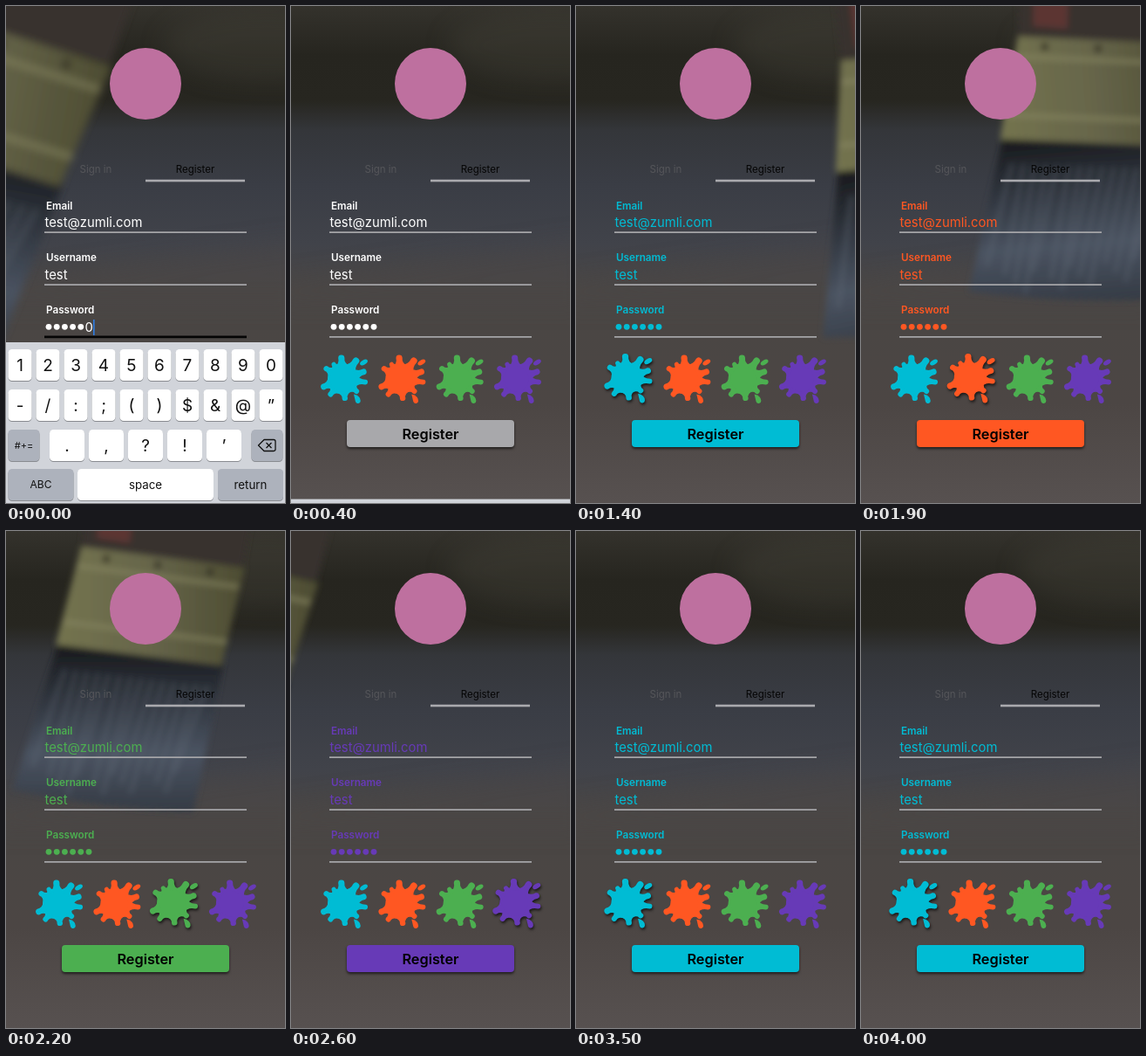
An HTML page that plays this animation: 320 px wide and 569 px high, repeating every 4100 ms.

```html
<!DOCTYPE html>
<html lang="en">
<head>
<meta charset="utf-8">
<title>Register</title>
<style>
  html, body { margin: 0; width: 100%; height: 100%; overflow: hidden; background: #2b2925; }
  svg { display: block; width: 320px; height: 569px; font-family: Inter, Roboto, sans-serif; }
  .tab { font-size: 11.5px; text-anchor: middle; }
  .label { font-size: 11.7px; font-weight: 600; }
  .value { font-size: 14.8px; }
  .key { text-anchor: middle; fill: #111; }
  .lift { filter: drop-shadow(1px 2px 1.5px rgba(0, 0, 0, .65)); }
  #button { filter: drop-shadow(0 2px 1.5px rgba(0, 0, 0, .6)); }
</style>
</head>
<body>
<svg viewBox="0 0 320 569">
  <defs>
    <linearGradient id="room" x1="0" y1="0" x2="0" y2="1">
      <stop offset="0" stop-color="#34322c"/>
      <stop offset=".1" stop-color="#26251f"/>
      <stop offset=".19" stop-color="#272620"/>
      <stop offset=".25" stop-color="#34363a"/>
      <stop offset=".36" stop-color="#3a3d45"/>
      <stop offset=".48" stop-color="#41434a"/>
      <stop offset=".57" stop-color="#494644"/>
      <stop offset=".8" stop-color="#4c4644"/>
      <stop offset="1" stop-color="#575150"/>
    </linearGradient>
    <linearGradient id="metal" x1="0" y1="0" x2="1" y2="0">
      <stop offset="0" stop-color="#74744f"/>
      <stop offset=".5" stop-color="#66654a"/>
      <stop offset="1" stop-color="#4d4c32"/>
    </linearGradient>
    <linearGradient id="hair" x1="0" y1="0" x2="0" y2="1">
      <stop offset="0" stop-color="#17181b"/>
      <stop offset=".28" stop-color="#2b3038"/>
      <stop offset=".65" stop-color="#4a5361"/>
      <stop offset="1" stop-color="#343a44"/>
    </linearGradient>
    <filter id="soft" x="-20%" y="-20%" width="140%" height="140%"><feGaussianBlur stdDeviation="3.5"/></filter>
    <filter id="haze" x="-50%" y="-50%" width="200%" height="200%"><feGaussianBlur stdDeviation="14"/></filter>
  </defs>

  <rect width="320" height="569" fill="url(#room)"/>
  <ellipse cx="300" cy="45" rx="120" ry="40" fill="#4a463d" opacity=".35" filter="url(#haze)"/>
  <path d="M-20 318L340 268V340H-20Z" fill="#4b4746" opacity=".5" filter="url(#haze)"/>
  <ellipse id="mirror" cx="295" cy="350" rx="48" ry="38" fill="#6c7356" filter="url(#haze)"/>

  <g id="brush" filter="url(#soft)">
    <path d="M95 -60L285 -35L272 40L86 22Z" fill="#37312e"/>
    <path d="M110 -60L150 -55L142 14L104 8Z" fill="#5b3432"/>
    <path d="M60 128L250 150L215 322Q110 318 8 296Z" fill="url(#hair)"/>
    <g id="strands" stroke="#69727f" stroke-width="4" opacity=".35"/>
    <path d="M86 18L274 42L247 154L57 130Z" fill="url(#metal)"/>
    <path d="M82 40L267 64M66 104L254 127" stroke="#8b8a64" stroke-width="5" opacity=".6"/>
    <g fill="#302f20"><circle cx="115" cy="32" r="4"/><circle cx="174" cy="39" r="4"/><circle cx="234" cy="47" r="4"/></g>
  </g>

  <circle cx="160" cy="89" r="41" fill="#be709f"/>

  <text class="tab" x="103" y="190.5" fill="#55565a">Sign in</text>
  <text class="tab" x="217" y="190.5" fill="#050505">Register</text>
  <rect x="160" y="198.7" width="114" height="2.6" fill="#aaaaae"/>

  <g id="form">
    <text class="label" x="46" y="232.5">Email</text>
    <text class="value" x="44.5" y="253">test@zumli.com</text>
    <text class="label" x="46" y="292.3">Username</text>
    <text class="value" x="44.5" y="313">test</text>
    <text class="label" x="46" y="352.3">Password</text>
    <g id="dots"></g>
    <text class="value" id="typed" x="90.5" y="373">0</text>
  </g>
  <rect id="caret" x="100" y="359" width="1.6" height="18" fill="#2f7de1"/>
  <path d="M44 259.2H276M44 319.2H276" stroke="#a5a5a8" stroke-width="1.7"/>
  <path id="line" d="M44 378.8H276"/>

  <g id="splats"></g>
  <g id="button">
    <rect id="face" x="64" y="474" width="192" height="31" rx="4"/>
    <text x="160" y="495.7" font-size="16.3" font-weight="600" text-anchor="middle">Register</text>
  </g>
  <g id="keyboard"><rect y="385" width="320" height="190" fill="#d1d4da"/></g>
</svg>

<script>
const LOOP = 4100, STEP = 100;
const COLORS = ['#00bcd4', '#ff5722', '#4caf50', '#673ab7'];
const PICKS = [[1300, 0], [1700, 1], [2100, 2], [2500, 3], [2900, 0]];
// time, x, y, angle, scale
const PATH = [
  [0, -194, 16, 10, 1.3], [200, -300, 10, 10, 1.3], [400, -460, 0, 8, 1.2],
  [401, 420, 50, -12, 1.1], [700, 310, 50, -12, 1.1], [1000, 181, 46, -12, 1.1],
  [1400, 240, 32, -12, 1.1], [1700, 170, 20, -8, 1.05], [2200, 0, 0, 0, 1],
  [2500, -170, 8, 4, 1.05], [2800, -420, 16, 6, 1.1], [2801, 420, 20, -12, 1.05],
  [3100, 240, 20, -12, 1.05], [3500, 420, 20, -12, 1.05], [LOOP, 420, 20, -12, 1.05]
];
// angle in degrees, length, half width
const ARMS = [
  [-94, 24, 3.6], [-54, 25.5, 3.8], [-19, 25.5, 3.4], [8, 26, 2.8], [42, 21, 3],
  [84, 22, 3.2], [129, 22.5, 3], [158, 24, 3.6], [212, 22.5, 3.2], [238, 20, 2.6]
];

const $ = id => document.getElementById(id);

function add(parent, tag, attrs, text) {
  const el = document.createElementNS('http://www.w3.org/2000/svg', tag);
  for (const name in attrs) el.setAttribute(name, attrs[name]);
  if (text) el.textContent = text;
  return parent.appendChild(el);
}

function armPath([deg, len, w]) {
  const a = deg * Math.PI / 180, c = Math.cos(a), s = Math.sin(a);
  const at = (r, side) => `${(r * c - side * s).toFixed(1)} ${(r * s + side * c).toFixed(1)}`;
  const neck = w * .65;
  return `M${at(14, -9)}Q${at(18, -neck)} ${at(len, -w)}A${w} ${w} 0 0 1 ${at(len, w)}Q${at(18, neck)} ${at(14, 9)}Z`;
}

const splats = COLORS.map((fill, i) => {
  const g = add($('splats'), 'g', { fill });
  add(g, 'circle', { r: 17.5 });
  add(g, 'path', { d: ARMS.map(armPath).join('') });
  add(g, 'ellipse', { rx: 4.8, ry: 2.7, transform: 'translate(24 -19) rotate(-30)' });
  add(g, 'path', { d: 'M12.5 17.5Q20 19 20.3 25A3 3 0 0 1 14.5 26Z' });
  return { g, x: 59.5 + 66.3 * i, y: 427 };
});

const dots = Array.from({ length: 6 }, (_, i) =>
  add($('dots'), 'circle', { cx: 49 + 9.2 * i, cy: 367.3, r: 3.4 }));

for (let i = 0; i < 14; i++) {
  const x = 68 + i * 12.5;
  add($('strands'), 'path', { d: `M${x} ${158 + i * 1.5}L${x - 38 + (i * 7) % 9} ${270 + (i * 11) % 34}` });
}

function key(label, x, y, w, size = 19, fill = '#fff') {
  add($('keyboard'), 'rect', { x, y: y + 1, width: w, height: 36, rx: 4.5, fill: '#898b90' });
  add($('keyboard'), 'rect', { x, y, width: w, height: 36, rx: 4.5, fill });
  add($('keyboard'), 'text', { class: 'key', x: x + w / 2, y: y + 18 + size * .36, 'font-size': size }, label);
}

const GRAY = '#adb2bc';
[...'1234567890'].forEach((c, i) => key(c, 2.5 + 32 * i, 393, 27));
[...'-/:;()$&@”'].forEach((c, i) => key(c, 2.5 + 32 * i, 439, 27));
[...'.,?!’'].forEach((c, i) => key(c, 50 + 45 * i, 485, 40));
key('#+=', 2.5, 485, 36, 11, GRAY);
key('', 281.5, 485, 36, 11, GRAY);
add($('keyboard'), 'path', {
  d: 'M289.5 503L296 496.5H307Q309 496.5 309 498.5V507.5Q309 509.5 307 509.5H296ZM298.5 500L304.5 506M304.5 500L298.5 506',
  fill: 'none', stroke: '#111', 'stroke-width': 1.3, 'stroke-linejoin': 'round'
});
key('ABC', 2.5, 530, 75, 12, GRAY);
key('space', 82, 530, 156, 13.3);
key('return', 243, 530, 75, 13.3, GRAY);

function pose(t) {
  const i = Math.max(1, PATH.findIndex(p => p[0] > t));
  const a = PATH[i - 1], b = PATH[i], u = (t - a[0]) / (b[0] - a[0]);
  return a.map((v, k) => v + (b[k] - v) * u);
}

function draw(t) {
  const [, x, y, angle, scale] = pose(t);
  $('brush').setAttribute('transform',
    `translate(${165 + x} ${90 + y}) rotate(${angle}) scale(${scale}) translate(-165 -90)`);
  $('mirror').setAttribute('opacity', Math.max(0, .65 - Math.abs(t - 1000) / 600));

  const typing = t < 100;
  $('typed').style.display = $('caret').style.display = typing ? '' : 'none';
  dots[5].style.display = typing ? 'none' : '';
  $('line').setAttribute('stroke', typing ? '#050505' : '#a5a5a8');
  $('line').setAttribute('stroke-width', typing ? 2.8 : 1.7);

  const s = Math.max(0, t - 100) / 1000 * 18.7;
  const drop = 184 * (1 - (1 + s) * Math.exp(-s));
  $('keyboard').setAttribute('transform', `translate(0 ${drop.toFixed(2)})`);
  $('keyboard').style.display = t < 600 ? '' : 'none';

  const pick = PICKS.reduce((last, [start, i]) => t >= start ? i : last, -1);
  $('form').setAttribute('fill', COLORS[pick] || '#fff');
  $('face').setAttribute('fill', COLORS[pick] || '#a8a8ab');
  splats.forEach(({ g, x, y }, i) => {
    const on = i === pick;
    g.setAttribute('transform', `translate(${x - on * 1.2} ${y - on}) scale(${on ? 1.02 : 1})`);
    g.setAttribute('class', on ? 'lift' : '');
  });
}

const start = performance.now();
function tick() {
  const t = (performance.now() - start) % LOOP;
  draw(Math.floor(t / STEP) * STEP);
  requestAnimationFrame(tick);
}
tick();
</script>
</body>
</html>
```
